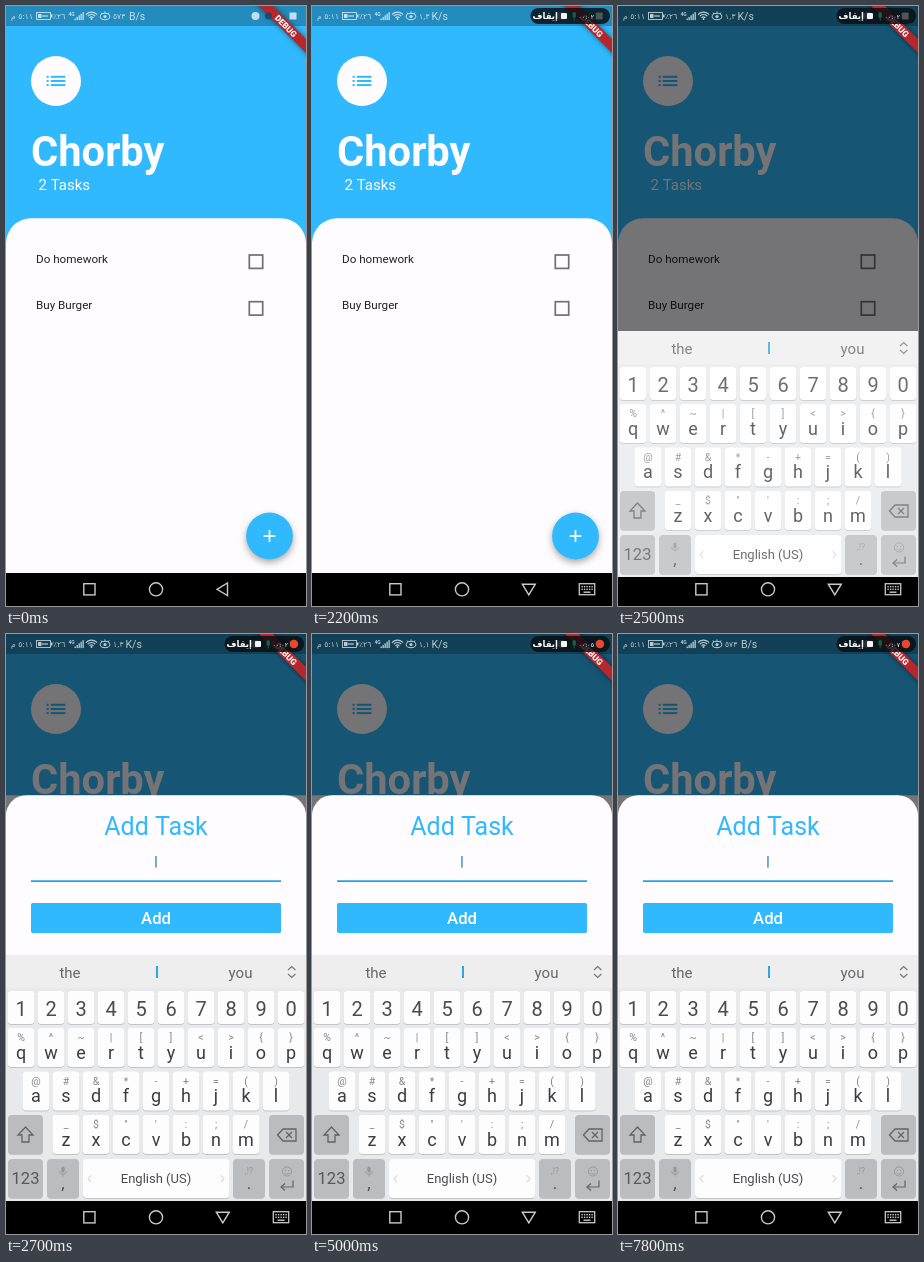
These frames come from a looping animation (300x600 px, 8000 ms). An HTML page with a canvas:

```html
<!DOCTYPE html>
<html lang="en">
<head>
<meta charset="utf-8">
<title>Task list</title>
<style>
  html, body { margin: 0; width: 100%; height: 100%; overflow: hidden; background: #000; }
  canvas { display: block; width: 100vw; height: 100vh; }
</style>
</head>
<body>
<canvas id="stage"></canvas>
<script>
const W = 300, H = 600, LOOP = 8000;
const BLUE = '#30b9fe', PAPER = '#fefcff', DIM = '#757575';
const SANS = 'Roboto, sans-serif', ARABIC = '"DejaVu Sans", sans-serif';

const canvas = document.getElementById('stage');
const scale = Math.max(1, window.devicePixelRatio || 1);
canvas.width = W * scale;
canvas.height = H * scale;
const c = canvas.getContext('2d');

function rect(x, y, w, h, fill) {
  c.fillStyle = fill;
  c.fillRect(x, y, w, h);
}

function round(x, y, w, h, r, fill) {
  c.beginPath();
  c.roundRect(x, y, w, h, r);
  c.fillStyle = fill;
  c.fill();
}

function disc(x, y, r, fill) {
  c.beginPath();
  c.arc(x, y, r, 0, Math.PI * 2);
  c.fillStyle = fill;
  c.fill();
}

function ring(x, y, r, color, width) {
  c.beginPath();
  c.arc(x, y, r, 0, Math.PI * 2);
  c.strokeStyle = color;
  c.lineWidth = width;
  c.stroke();
}

function box(x, y, w, h, color, width) {
  c.strokeStyle = color;
  c.lineWidth = width;
  c.strokeRect(x, y, w, h);
}

function line(points, color, width, close) {
  c.beginPath();
  points.forEach(([x, y]) => c.lineTo(x, y));
  if (close) c.closePath();
  c.strokeStyle = color;
  c.lineWidth = width;
  c.stroke();
}

function text(s, x, y, size, color, { weight = 400, align = 'left', font = SANS, dir = 'ltr' } = {}) {
  c.font = `${weight} ${size}px ${font}`;
  c.textAlign = align;
  c.direction = dir;
  c.fillStyle = color;
  c.fillText(s, x, y);
}

const mid = (s, x, y, size, color, weight = 400) =>
  text(s, x, y, size, color, { weight, align: 'center' });

const arabic = s => s.replace(/\d/g, d => String.fromCharCode(0x660 + Number(d)));

// Shared half-second blink of the caret and the recording light
const blink = (t, on = 500) => (t + 400) % 1000 < on;

function drawTask(label, y) {
  text(label, 30, y, 11.67, '#222');
  box(243.3, y - 7.7, 13.4, 13.4, '#707070', 1.7);
}

function drawApp() {
  rect(0, 0, W, H, BLUE);
  disc(50, 75, 25, PAPER);
  for (const y of [69.8, 74, 78.1]) {
    rect(40.6, y, 2.1, 2, BLUE);
    rect(44.8, y, 14.6, 2, BLUE);
  }
  text('Chorby', 25, 160, 41.67, PAPER, { weight: 700 });
  text('2 Tasks', 32.5, 184, 15, PAPER);

  round(0, 212.3, W, 400, [25, 25, 0, 0], PAPER);
  drawTask('Do homework', 256.7);
  drawTask('Buy Burger', 303.4);

  c.save();
  c.shadowColor = 'rgba(0,0,0,.34)';
  c.shadowBlur = 7 * scale;
  c.shadowOffsetY = 3 * scale;
  disc(263.5, 530, 23.4, BLUE);
  c.restore();
  rect(257.6, 529.2, 11.8, 1.7, '#fff');
  rect(262.65, 524.1, 1.7, 11.8, '#fff');
}

function drawSheet(t) {
  const raised = t >= 2600;
  const top = raised ? 161.3 : 407.3;
  rect(0, top, W, H - top, DIM);
  round(0, top, W, H - top, [20, 20, 0, 0], PAPER);
  mid('Add Task', 150, top + 39.7, 25, BLUE);

  if (t < 3100 || blink(t)) {
    const fading = t >= 3600 && (t + 400) % 1000 < 200;
    c.globalAlpha = fading ? .75 : 1;
    rect(149.1, top + 60.7, 1.7, 11.6, raised ? '#5d9fc6' : BLUE);
    c.globalAlpha = 1;
  }

  if (raised) rect(25, top + 85, 250, 1.7, t < 2700 ? '#5d9fbe' : '#1ba3e3');
  else rect(25, top + 85.4, 250, .9, '#858585');

  round(25, top + 107.7, 250, 30, 1.7, BLUE);
  mid('Add', 150, top + 128.8, 16.7, '#fff', 500);
}

function key(x, y, w, h, fill = '#fdfdfe') {
  round(x, y + 1, w, h, 4, '#c3c4c7');
  round(x, y, w, h, 4, fill);
}

function letters(row, hints, x0, y) {
  [...row].forEach((ch, i) => {
    const x = x0 + i * 30;
    key(x, y, 27, 39);
    mid(hints[i], x + 13.5, y + 13, 10.5, '#85868a');
    mid(ch, x + 13.5, y + 30.5, 18, '#3c3d40');
  });
}

function drawKeyboard(t) {
  const gray = '#babcbf', ink = '#4a4b4e', faint = '#95969a';
  c.save();
  c.translate(0, t < 2600 ? 4 : 0);
  rect(0, 321, W, 246, '#e8e9eb');
  rect(0, 321, W, 33, '#eeeeef');

  mid('the', 64, 344, 15, '#66676a');
  rect(150, 332, 2, 12, '#2ba8ea');
  mid('you', 234.5, 344, 15, '#66676a');
  line([[282, 336], [285.7, 332.5], [289.4, 336]], '#77787b', 1.2);
  line([[282, 340], [285.7, 343.5], [289.4, 340]], '#77787b', 1.2);

  [...'1234567890'].forEach((d, i) => {
    key(1.5 + i * 30, 357, 27, 33);
    mid(d, 15 + i * 30, 381.5, 20, ink);
  });
  letters('qwertyuiop', '%^~|[]<>{}', 1.5, 394);
  letters('asdfghjkl', '@#&*-+=()', 16.5, 437.5);
  letters('zxcvbnm', '_$"\':;/', 46.5, 481);

  // Shift and backspace
  key(2, 481, 35, 39, gray);
  line([[19.5, 493], [27, 501], [23, 501], [23, 508], [16, 508], [16, 501], [12, 501]], '#626366', 1.3, true);
  key(263, 481, 35, 39, gray);
  line([[271.5, 501], [277, 495], [290, 495], [290, 507], [277, 507]], '#626366', 1.3, true);
  line([[280, 498], [286, 504]], '#626366', 1.3);
  line([[286, 498], [280, 504]], '#626366', 1.3);

  // Bottom row
  key(2, 525, 35, 39, gray);
  mid('123', 19.5, 550, 16.5, '#56575a');
  key(41, 525, 32, 39, gray);
  round(55.4, 532.5, 3.2, 6, 1.6, faint);
  line([[53.5, 537], [55, 540], [59, 540], [60.5, 537]], faint, .8);
  line([[57, 540], [57, 542.5]], faint, .8);
  mid(',', 57, 555, 17, ink);
  key(77, 525, 146.5, 39);
  line([[85, 541.5], [82, 544.7], [85, 548]], '#c5c6c9', 1);
  line([[215, 541.5], [218, 544.7], [215, 548]], '#c5c6c9', 1);
  mid('English (US)', 150, 549.3, 13, '#4a4b4e');
  key(227, 525, 32, 39, gray);
  mid(',!?', 243, 540, 8.5, faint);
  mid('.', 243, 555, 17, ink);
  key(263, 525, 35, 39, gray);
  ring(281, 537.5, 4.6, faint, .9);
  disc(279.4, 536.4, .6, faint);
  disc(282.6, 536.4, .6, faint);
  c.beginPath();
  c.arc(281, 537.8, 2.4, .3, Math.PI - .3);
  c.lineWidth = .8;
  c.strokeStyle = faint;
  c.stroke();
  line([[287, 546.5], [287, 553], [276, 553]], '#626366', 1.2);
  line([[279, 549.5], [275, 553], [279, 556.5]], '#626366', 1.2);

  if (t < 2600) rect(0, 321, W, 246, 'rgba(255,255,255,.2)');
  c.restore();
}

function drawNav(t) {
  const y = t >= 2500 && t < 2600 ? 571 : 567;
  const typing = t >= 2100, ink = '#c9c9c9';
  rect(0, y, W, H - y, '#000');
  box(77.8, 577.7, 11.2, 11.2, ink, 1.4);
  ring(150, 583.3, 6.6, ink, 1.4);
  if (!typing) {
    line([[211, 583.3], [221.5, 577], [221.5, 589.6]], ink, 1.4, true);
    return;
  }
  line([[210.3, 578.2], [223.3, 578.2], [216.8, 588.8]], ink, 1.4, true);
  box(267.3, 577.7, 15.4, 11, ink, 1.3);
  for (const ky of [580, 582.6])
    for (let i = 0; i < 5; i++) rect(269.4 + i * 2.5, ky, 1.4, 1.4, ink);
  rect(271.5, 585.5, 7, 1.4, ink);
}

function drawStatus(t) {
  const ink = 'rgba(255,255,255,.72)';
  const small = (s, x, size = 7.6) => text(arabic(s), x, 13, size, ink, { font: ARABIC });
  text(arabic('5:11 م'), 27, 13, 7.6, ink, { font: ARABIC, align: 'right', dir: 'rtl' });

  box(30.5, 6.5, 14, 7, ink, .9);
  rect(45, 8.5, 1.5, 3, ink);
  rect(32, 8, 3.5, 4, ink);
  line([[36, 10], [42, 10]], ink, 1.2);
  small('٪26', 47);
  text('4G', 62.5, 9.5, 5, ink, { weight: 700 });
  for (let i = 0; i < 5; i++) rect(68.5 + i * 2, 12.5 - i * 1.6, 1.3, 1.6 + i * 1.6, ink);

  c.strokeStyle = ink;
  c.lineWidth = 1.1;
  for (const r of [2.6, 5, 7.4]) {
    c.beginPath();
    c.arc(85.5, 13.5, r, -Math.PI * .77, -Math.PI * .23);
    c.stroke();
  }
  disc(85.5, 13, 1, ink);

  c.beginPath();
  c.ellipse(99, 10.5, 4.8, 3.2, 0, 0, Math.PI * 2);
  c.lineWidth = 1;
  c.stroke();
  disc(99, 10.5, 1.6, ink);
  line([[95, 6.5], [96, 8]], ink, .9);
  line([[99, 5.3], [99, 7]], ink, .9);
  line([[103, 6.5], [102, 8]], ink, .9);

  const slow = t < 2000 || t >= 6000;
  small(slow ? '573' : t < 3000 ? '1,3' : '1,1', 107);
  text(slow ? 'B/s' : 'K/s', slow ? 123 : 119.5, 13.7, 10.5, ink);

  disc(249.5, 10, 4, ink);
  disc(262.5, 10, 3.6, 'rgba(20,70,110,.8)');
  rect(283.5, 6.5, 7, 7, ink);
}

function drawRibbon() {
  c.save();
  c.translate(W, 0);
  c.rotate(Math.PI / 4);
  c.shadowColor = 'rgba(0,0,0,.5)';
  c.shadowBlur = 5 * scale;
  rect(-40, 23.3, 80, 10, '#b3272d');
  c.shadowColor = 'transparent';
  mid('DEBUG', 0, 31.4, 8.5, '#fff', 900);
  c.restore();
}

function drawRecorder(t) {
  round(218.5, 2, 79.5, 16, 8, 'rgba(8,14,18,.82)');
  text('إيقاف', 246, 13, 8.6, '#fff', { font: ARABIC, align: 'right', dir: 'rtl', weight: 700 });
  round(249, 7, 6, 6, 1, '#f4f4f4');
  round(260.5, 6, 3.4, 6, 1.7, '#1d5b45');
  rect(261.7, 12, 1, 2.5, '#1d5b45');
  const seconds = '00:0' + Math.floor(t / 1000);
  text(arabic(seconds), 282, 12.7, 6.2, '#fff', { font: ARABIC, align: 'right' });
  if (blink(t, t < 2000 ? 400 : 500)) disc(288, 10, 4.2, '#f0452c');
  else rect(284, 6.7, 6.6, 6.6, '#50555a');
}

function draw(t) {
  c.setTransform(scale, 0, 0, scale, 0, 0);
  drawApp();
  if (t >= 2400) {
    rect(0, 0, W, H, 'rgba(0,0,0,.54)');
    drawSheet(t);
  }
  rect(0, 0, W, 20, 'rgba(0,0,0,.25)');
  drawNav(t);
  if (t >= 2500) drawKeyboard(t);
  drawRibbon();
  drawStatus(t);
  if (t >= 100) drawRecorder(t);
}

const start = performance.now();
function tick() {
  draw((performance.now() - start) % LOOP);
  requestAnimationFrame(tick);
}
tick();
</script>
</body>
</html>
```
